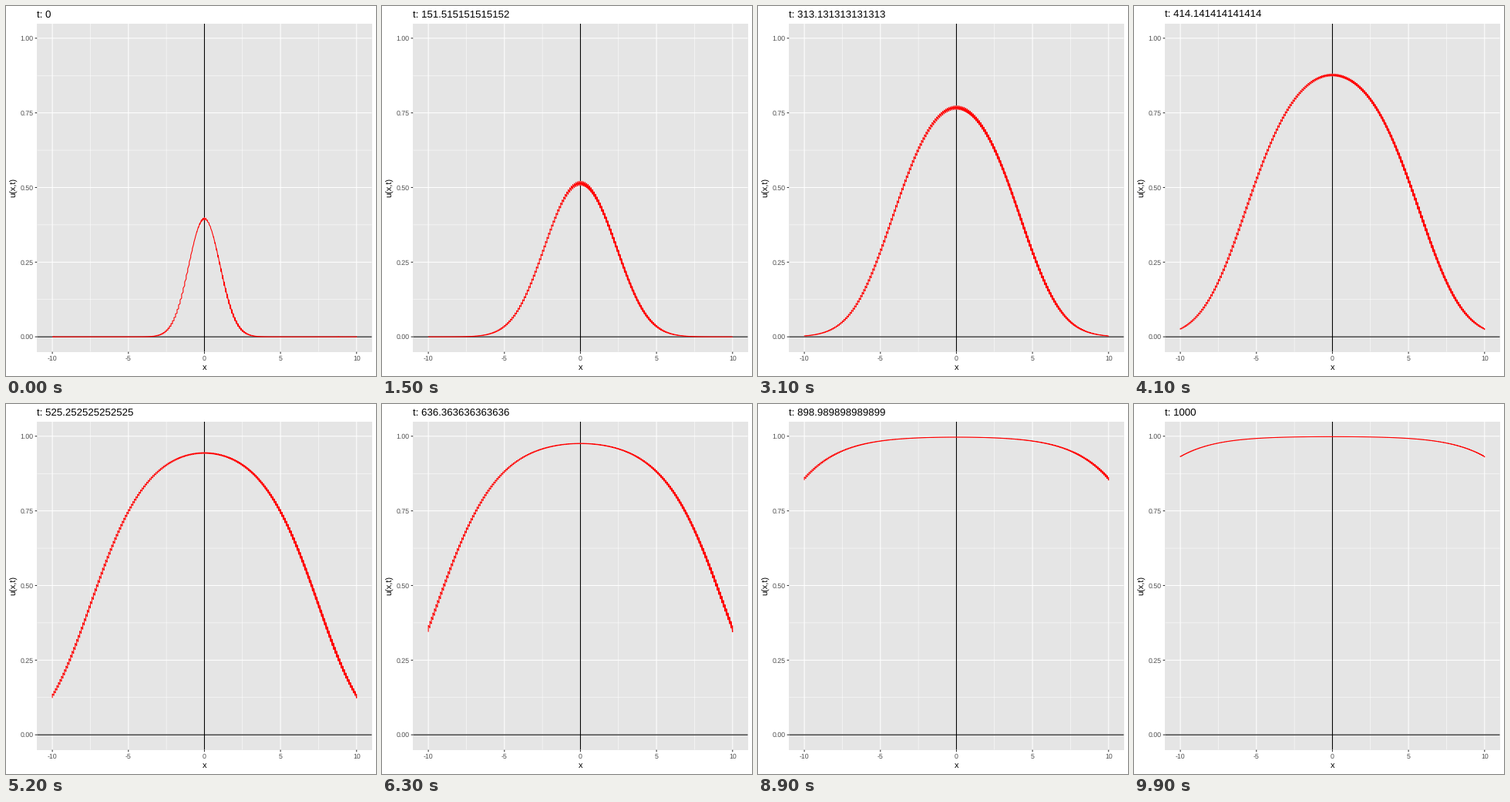
Write a matplotlib script that moves like this. It is 480 by 480 pixels and loops after 10000 ms.

```python
import matplotlib.pyplot as plt
import numpy as np
from matplotlib.animation import FuncAnimation
from matplotlib.patches import Rectangle

SIZE, DPI = 480, 80
PT = 72 / DPI  # points per pixel
FRAMES, STEPS, DT = 100, 1000, 0.01
LEFT, RIGHT, TOP, BOTTOM = 40.4, 474.5, 23.0, 448.5
THICK, THIN = 1.07, 0.53

plt.rcParams.update({
    "font.family": "Liberation Sans",
    "text.hinting": "none",
    "path.simplify": False,
})


def solve():
    """Fisher's equation u_t = u_xx + u(1 - u) from a normal density."""
    n, dx = 640, 0.1
    x = (np.arange(n) - n // 2) * dx
    u = np.exp(-x**2 / 2) / np.sqrt(2 * np.pi)
    decay = np.exp(-(2 * np.pi * np.fft.rfftfreq(n, dx))**2 * DT)
    gain = np.exp(DT / 2)

    def react(v):
        return v * gain / (1 + v * (gain - 1))

    shown = np.abs(x) < 10 + dx / 2
    rows = [u[shown]]
    for _ in range(STEPS):
        u = react(np.fft.irfft(np.fft.rfft(react(u)) * decay, n))
        rows.append(u[shown])
    return x[shown], np.array(rows)


xs, U = solve()
bucket = np.rint((FRAMES - 1) * np.arange(STEPS + 1) / STEPS)
peak = U.max()


def px(x):
    return LEFT + (x + 11) / 22 * (RIGHT - LEFT)


def py(u):
    return BOTTOM - (u / peak + 0.05) / 1.1 * (BOTTOM - TOP)


fig = plt.figure(figsize=(SIZE / DPI, SIZE / DPI), dpi=DPI, facecolor="white")
ax = fig.add_axes([0, 0, 1, 1])
ax.set(xlim=(0, SIZE), ylim=(SIZE, 0))
ax.axis("off")


def stroke(x, y, color, width=THICK, z=1):
    line, = ax.plot(x, y, color=color, lw=width * PT, zorder=z, snap=False,
                    solid_capstyle="butt", solid_joinstyle="round")
    return line


def label(x, y, s, size, color="black", **kw):
    return ax.text(x, y, s, fontsize=size * PT, color=color,
                   **{"va": "baseline", **kw})


def vertical(x, color, width=THICK, z=1):
    stroke([px(x)] * 2, [TOP, BOTTOM], color, width, z)


def horizontal(u, color, width=THICK, z=1):
    stroke([LEFT, RIGHT], [py(u)] * 2, color, width, z)


ax.add_patch(Rectangle((LEFT, TOP), RIGHT - LEFT, BOTTOM - TOP,
                       fc="#e5e5e5", ec="none", zorder=0))

for x in (-7.5, -2.5, 2.5, 7.5):
    vertical(x, "white", THIN)
for u in (0.125, 0.375, 0.625, 0.875):
    horizontal(u, "white", THIN)

for x in range(-10, 11, 5):
    vertical(x, "white", z=2)
    stroke([px(x)] * 2, [BOTTOM, BOTTOM + 2.75], "#333333")
    label(px(x), 460, str(x), 8.8, "#4d4d4d", ha="center")
for u in np.linspace(0, 1, 5):
    horizontal(u, "white", z=2)
    stroke([LEFT - 2.75, LEFT], [py(u)] * 2, "#333333")
    label(35.5, py(u) + 3.2, f"{u:.2f}", 8.8, "#4d4d4d", ha="right")

horizontal(0, "black", z=3)
vertical(0, "black", z=3)
label(px(0), 472.3, "x", 11, ha="center")
label(13.4, (TOP + BOTTOM) / 2, "u(x,t)", 11, rotation=90,
      ha="right", va="center").set(ha="center", x=10.6)

title = label(LEFT, 15, "", 13.2)
curve = stroke([], [], "red", z=4)


def update(k):
    # every time step in this frame is joined at each x, giving the teeth
    rows = U[bucket == k]
    curve.set_data(np.repeat(px(xs), len(rows)), py(rows.T.ravel()))
    title.set_text(f"t: {k * STEPS / (FRAMES - 1):.15g}")
    return curve, title


anim = FuncAnimation(fig, update, frames=FRAMES, interval=100, repeat=True)
plt.show()
```
